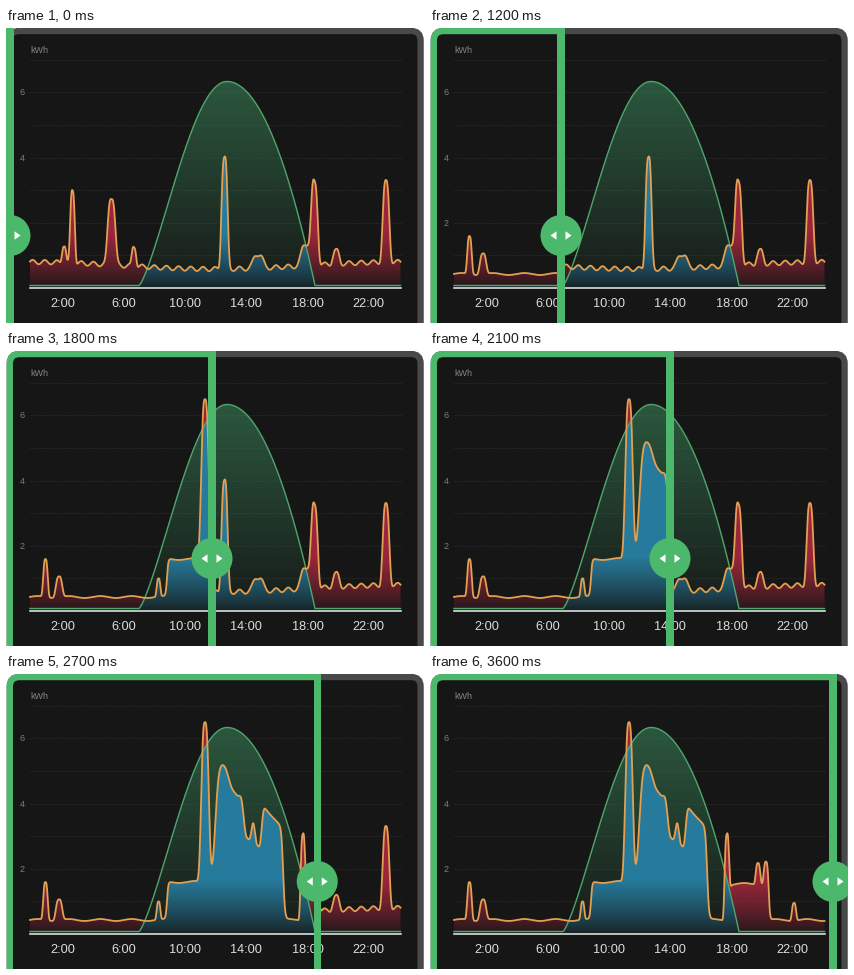
Write a matplotlib script that moves like this. It is 418 by 295 pixels and loops after 3.9 s.

```python
import numpy as np
import matplotlib.pyplot as plt
from matplotlib.animation import FuncAnimation
from matplotlib.patches import Circle, FancyBboxPatch, Polygon, Rectangle

W, H, DPI = 418, 295, 64
PT = 72 / DPI  # points per pixel
FRAMES, STEP = 13, 300

PANEL, GREEN, GREY = "#161616", "#4cb86b", "#494949"
LEFT, RIGHT, BASE = 24, 394.5, 260
UNIT = 32.6  # pixels per kWh
SLIDER = [4, 60, 131, 206, 274, 348.5, 403]  # every second step


def bump(x, center, width, height):
    return height * np.exp(-np.abs((x - center) / width) ** 3)


def rise(x, center, width):
    return 0.5 + 0.5 * np.tanh((x - center) / width)


def solar_curve(x):
    """Sun from about 6:40 to 18:40, peaking near 12:40."""
    u = np.clip((x - 221) / 88, -1, 1)
    morning = np.cos(np.pi * u / 2) ** 1.3
    return BASE - 2.5 - 204 * np.where(u < 0, morning, 1 - u ** 2)


def before_curve(x):
    """Flat household load with short peaks through the day."""
    level = 22.5 + 3.5 * np.cos(2 * np.pi * (x - LEFT) / (RIGHT - LEFT))
    level += 2.2 * np.cos(2 * np.pi * (x - 197) / 12.17)
    for peak in ((58, 2.5, 18), (66.5, 2.8, 73), (105.5, 4.6, 68),
                 (128, 2.7, 20), (218.5, 3.7, 112), (252, 6, 14),
                 (300, 6, 22), (308.5, 4, 82), (330, 4, 13), (380, 4, 80)):
        level += bump(x, *peak)
    return BASE - level


def after_curve(x):
    """Load moved under the sun, with a smaller evening block."""
    midday = 38 * rise(x, 161, 1.3)
    midday += rise(x, 209.5, 3.5) * (121 - 1.05 * (x - 214))
    for peak in ((199, 4.5, 160), (229, 7.5, -16), (242, 5.2, -48),
                 (252, 4.2, -46)):
        midday += bump(x, *peak)
    evening = 36 * (rise(x, 299, 1.5) - rise(x, 339, 1.2))
    level = 14 + np.cos(x / 5) + midday * (1 - rise(x, 277.2, 1.8)) + evening
    for peak in ((39.5, 2.7, 38), (53, 3.8, 21), (152.5, 2.2, 18),
                 (296.8, 2.6, 85), (328, 2.7, 22), (336, 2.7, 23),
                 (364, 2.5, 18)):
        level += bump(x, *peak)
    return BASE - level


xs = np.arange(LEFT, RIGHT + 0.1, 0.25)
solar, before, after = solar_curve(xs), before_curve(xs), after_curve(xs)

fig = plt.figure(figsize=(W / DPI, H / DPI), dpi=DPI, facecolor="white")
ax = fig.add_axes([0, 0, 1, 1])
ax.axis("off")


def area(top):
    return np.vstack([[LEFT, BASE], np.column_stack([xs, top]), [RIGHT, BASE]])


def gradient(color, alpha, z):
    """Vertical gradient image with a polygon as its clip."""
    img = np.ones((H, 1, 4))
    img[..., :3] = np.array(color) / 255
    img[:, 0, 3] = alpha
    im = ax.imshow(img, extent=(0, W, H, 0), aspect="auto", zorder=z)
    shape = Polygon(area(solar), transform=ax.transData)
    im.set_clip_path(shape)
    return im, shape


def frame_box(z, **style):
    return ax.add_patch(FancyBboxPatch(
        (3.8, 3), W - 7.2, H + 40, boxstyle="round,pad=0,rounding_size=9.5",
        lw=6.3 * PT, zorder=z, **style))


def text(x, y, s, size, color):
    ax.text(x, y, s, fontsize=size * PT, color=color, ha="center",
            va="center_baseline", family="Liberation Sans", zorder=3)


frame_box(0, fc=PANEL, ec="none")

for n in range(1, 8):
    y = BASE - n * UNIT
    ax.plot([LEFT, RIGHT], [y, y], color="#303030", lw=0.8 * PT,
            ls=(0, (1.5, 1.5)), zorder=1)
    if n in (2, 4, 6):
        text(16, y - 0.4, str(n), 9, "#7c7c7c")
text(33, 21.3, "kWh", 9, "#858585")
for k in range(6):
    text(56.8 + 61.2 * k, 274.5, f"{2 + 4 * k}:00", 12.8, "#dcdcdc")

rows = np.arange(H) + 0.5
fade = np.clip((BASE - rows) / 55, 0, 1) ** 0.8
gradient((56, 128, 86), np.clip(0.62 - 0.57 * (rows - 54) / 204, 0, 0.62), 2)
red, red_clip = gradient((168, 40, 64), 0.04 + 0.88 * fade, 4)
# hides the red below the blue part
mask, mask_clip = gradient((22, 28, 28), np.ones(H), 4.5)
blue, blue_clip = gradient((40, 132, 168), 0.04 + 0.88 * fade, 5)

ax.plot([LEFT, RIGHT], [BASE - 0.5] * 2, color="#e0e6e2", lw=1.6 * PT, zorder=6)
ax.plot(xs, solar, color="#4fa66b", lw=1.4 * PT, zorder=7)
load_line, = ax.plot([], [], color="#e3a052", lw=1.8 * PT, zorder=8,
                     solid_joinstyle="round")

frame_box(9, fc="none", ec=GREY)
green = frame_box(10, fc="none", ec=GREEN)
green_clip = Rectangle((0, 0), 1, H, transform=ax.transData)

bar = ax.add_patch(Rectangle((0, 0), 7.5, H, fc=GREEN, ec="none", zorder=11))
knob = ax.add_patch(Circle((0, 207.5), 20.5, fc=GREEN, ec="none", zorder=12))
arrows = [ax.add_patch(Polygon([(0, 0)] * 3, fc="white", ec="none", zorder=13))
          for _ in range(2)]

ax.set_xlim(0, W)
ax.set_ylim(H, 0)


def update(i):
    s = np.interp(i / 2, range(len(SLIDER)), SLIDER)
    load = np.where(xs < s, after, before)
    load_line.set_data(xs, load)
    used = np.maximum(load, solar)
    for im, shape, top in ((red, red_clip, load), (mask, mask_clip, used),
                           (blue, blue_clip, used)):
        shape.set_xy(area(top))
        im.set_clip_path(shape)
    green_clip.set_width(s)
    green.set_clip_path(green_clip)
    bar.set_x(s - 3.7)
    knob.center = (s, 207.5)
    for arrow, side in zip(arrows, (-1, 1)):
        arrow.set_xy([(s + side * 4.5, 203.3), (s + side * 10.5, 207.5),
                      (s + side * 4.5, 211.7)])
    return []


anim = FuncAnimation(fig, update, frames=FRAMES, interval=STEP,
                     init_func=lambda: update(0), repeat=True, repeat_delay=0)
plt.show()
```
